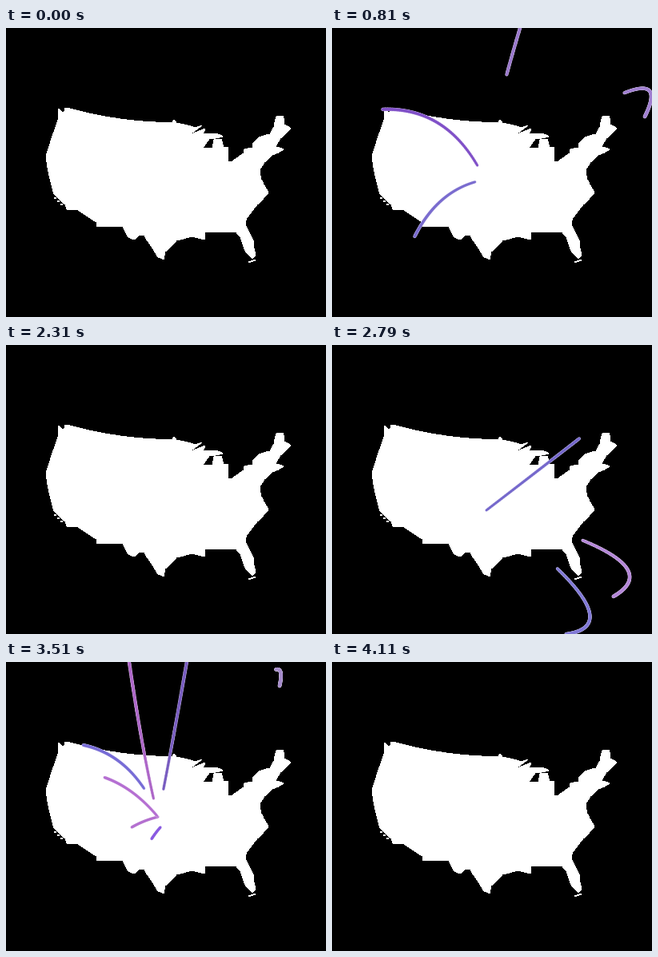
A matplotlib script that plays this animation: 400 px wide and 362 px high, repeating every 4410 ms.

```python
import numpy as np
import matplotlib.pyplot as plt
from matplotlib.animation import FuncAnimation
from matplotlib.collections import LineCollection
from matplotlib.colors import to_rgb

W, H, DPI = 400, 362, 100
FRAMES, INTERVAL = 147, 30
PX = 72 / DPI    # points per pixel
rng = np.random.default_rng(4)


def rough(points, amount=0.7):
    """Coastline: split every edge and nudge its midpoint."""
    points = np.array(points, float)
    middles = (points[:-1] + points[1:]) / 2
    middles += rng.uniform(-amount, amount, middles.shape)
    out = np.empty((len(points) * 2 - 1, 2))
    out[::2], out[1::2] = points, middles
    return out


def country():
    x = np.linspace(76, 208, 30)
    border = np.column_stack([x, 118.5 - 18.5 * ((208 - x) / 132) ** 2])
    lakes = [(210, 115), (213, 119), (237, 125), (245, 122), (229, 134), (249, 126),
             (246, 132), (262, 132), (271, 136), (254, 139), (246, 150), (258, 150),
             (260, 140), (269, 139), (272, 150), (278, 150), (277, 167), (283, 167),
             (297, 157), (298, 152), (309, 150), (308, 146), (316, 137), (330, 133)]
    atlantic = [(335, 124), (338, 111), (346, 110), (348, 121), (356, 126), (343, 138),
                (337, 149), (347, 152), (333, 159), (323, 168), (317, 177), (319, 190),
                (322, 196), (328, 206), (314, 221), (301, 238), (299, 246), (309, 266),
                (312, 285), (308, 289), (299, 279), (293, 262), (288, 256)]
    gulf = [(276, 255), (249, 256), (249, 265), (232, 261), (213, 266), (199, 280),
            (198, 290), (190, 287), (178, 268), (173, 260), (166, 260), (160, 265),
            (152, 261), (146, 249)]
    south_west = [(113, 248), (113, 243), (90, 228), (76, 227)]
    pacific = [(74, 221), (60, 208), (53, 180), (50, 160), (57, 138), (65, 115),
               (65, 101), (71, 107), (74, 100)]
    return np.vstack([border, rough(lakes, 0.4), rough(atlantic), rough(gulf),
                      south_west, rough(pacific)])


# Each burst: hub, delay of the tail in frames, and trails given as
# (colour, first frame, frames of flight, control point, end point).
bursts = [
    ((191, 190), 9, [
        ("#8a78d0", 0.5, 16, (380, 230), (318, 314)),
        ("#a07fd0", 9, 18, (440, 12), (391, 111)),
        ("#9a78cc", 9.5, 18, (200, 90), (300, -200)),
        ("#8050c8", 15, 17, (137, 75), (16, 110)),
        ("#7a6ccf", 14.5, 23, (90, 208), (72, 385)),
    ]),
    ((193, 207), 9, [
        ("#b487d8", 78, 16, (435, 269), (350, 316)),
        ("#8078d6", 78, 17, (392, 355), (285, 363)),
        ("#7568cc", 84.8, 18, (327, 104), (460, -1)),
        ("#8a5ae2", 112.7, 18, (154, 251), (128, 385)),
    ]),
    ((190, 194), 9, [
        ("#a58bcb", 96.3, 18, (360, -53), (342, 30)),
        ("#ad66c8", 104.5, 18, (162, 85), (130, -180)),
        ("#785cc0", 104, 18, (216, 65), (260, -200)),
        ("#b470d0", 112.2, 18, (90, 218), (66, 390)),
    ]),
    ((193, 198), 6.5, [
        ("#776cd6", 105, 21, (140, 66), (0, 114)),
        ("#b56fd2", 108.6, 21, (105, 86), (-45, 180)),
    ]),
]


def ease(x):
    x = np.clip(x, 0, 1)
    return x * x * (3 - 2 * x)


class Trail:
    """Stroke along a quadratic curve; its tail follows the head later."""

    def __init__(self, ax, hub, lag, color, start, flight, control, end):
        self.curve = np.array([hub, control, end], float)
        self.lag, self.start, self.flight = lag, start, flight
        pale = 0.4 * np.array(to_rgb(color)) + 0.6
        self.halo, self.core = (
            ax.add_collection(LineCollection([], colors=[c], capstyle="round"))
            for c in (pale, color))

    def update(self, frame):
        age = frame - self.start
        tail, head = ease((age - self.lag) / self.flight), ease(age / self.flight)
        segments, widths = [], np.ones(1)
        if head > tail:
            u = np.linspace(tail, head, 50)
            weights = np.column_stack([(1 - u) ** 2, 2 * u * (1 - u), u * u])
            points = weights @ self.curve
            segments = np.stack([points[:-1], points[1:]], axis=1)
            widths = 2.6 + 1.3 * u[1:]
        for line, extra in ((self.halo, 0.9), (self.core, 0)):
            line.set_segments(segments)
            line.set_linewidths((widths + extra) * PX)


fig = plt.figure(figsize=(W / DPI, H / DPI), dpi=DPI, facecolor="black")
ax = fig.add_axes([0, 0, 1, 1])
ax.set(xlim=(0, W), ylim=(H, 0))
ax.axis("off")

flat = dict(fc="white", lw=0, antialiased=False)
ax.add_patch(plt.Polygon(country(), **flat))
for i in range(3):
    ax.add_patch(plt.Rectangle((60 + 4 * i, 212 + 4 * i), 3, 1.5, **flat))
    ax.add_patch(plt.Rectangle((303 + 3 * i, 292 - i), 3, 1.5, **flat))

trails = [Trail(ax, hub, lag, *spec) for hub, lag, specs in bursts for spec in specs]


def update(frame):
    for trail in trails:
        trail.update(frame)
    return []


anim = FuncAnimation(fig, update, frames=FRAMES, interval=INTERVAL,
                     repeat=True, repeat_delay=0, blit=False)
plt.show()
```
